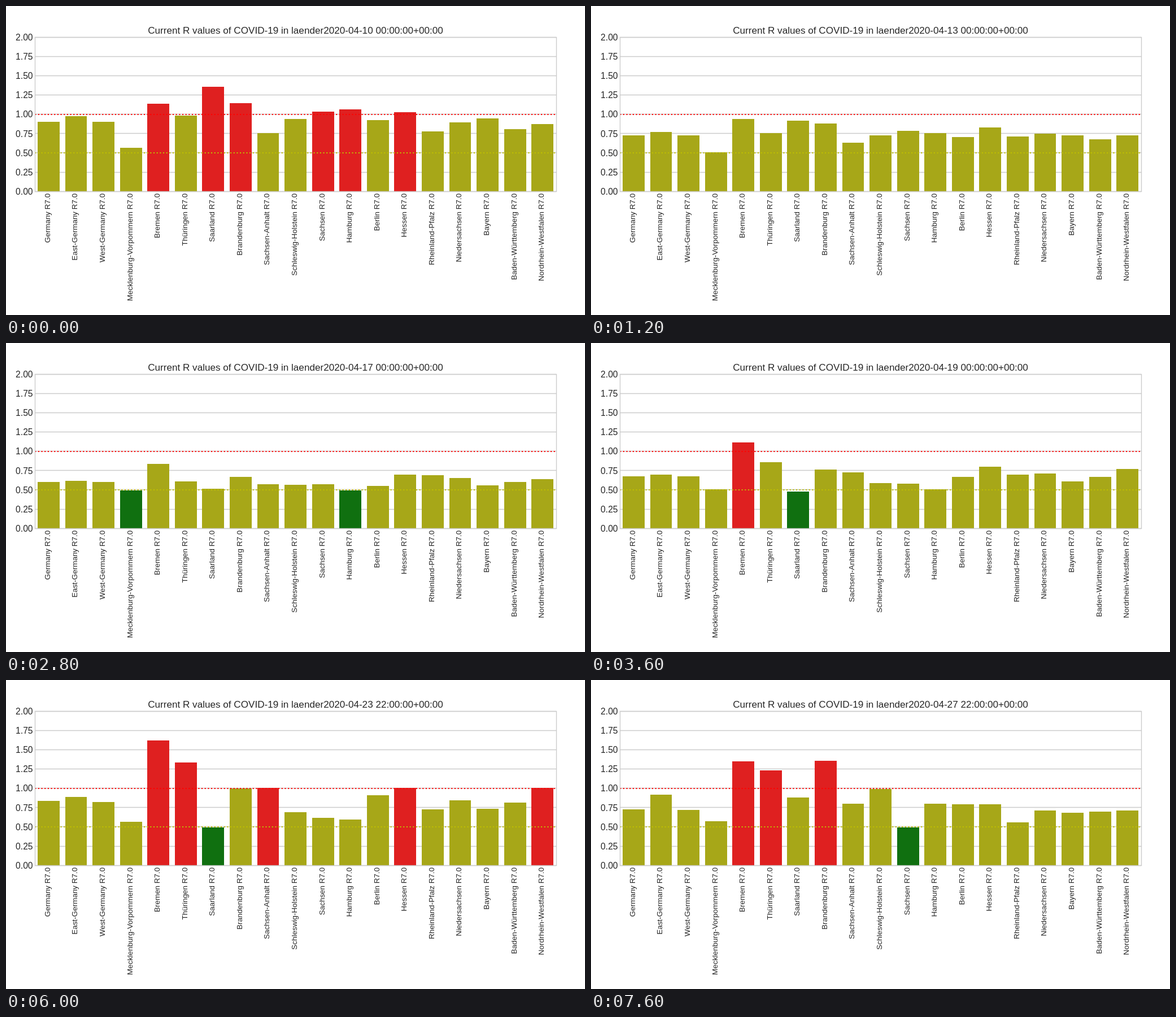
An HTML page for the animation above (8 s loop, 1025 px wide and 547 px high).

```html
<!DOCTYPE html>
<html lang="en">
<head>
<meta charset="utf-8">
<title>R values by state</title>
<style>
  html, body { margin: 0; width: 100%; height: 100%; overflow: hidden; background: #fff; }
  svg { display: block; width: 1025px; height: 547px; }
  text { font-family: "Liberation Sans", Arial, sans-serif; fill: #262626; }
</style>
</head>
<body>
<svg id="chart" viewBox="0 0 1025 547"></svg>
<script>
const STEP_MS = 400;
const LEFT = 51.15, RIGHT = 974, BASE = 328.2, UNIT = 136.6;

// National R value in percent, as [day, value] turning points
const trend = [[0, 90.5], [3, 72.7], [7, 60.2], [9, 67.6], [12, 74.9], [14, 83.6], [18, 72.7]];

// Each region's distance from the trend, in percent, on the anchor days
const anchorDays = [0, 6, 13, 18];
const regions = [
  ["Germany", 0, 0, 0, 0],
  ["East-Germany", 7, 1, 4, 19],
  ["West-Germany", 0, 0, -1, -1],
  ["Mecklenburg-Vorpommern", -34, -10, -28, -16],
  ["Bremen", 23, 20, 80, 62],
  ["Thüringen", 8, -2, 50, 50],
  ["Saarland", 45, -7, -39, 15],
  ["Brandenburg", 24, 6, 12, 63],
  ["Sachsen-Anhalt", -15, -4, 18, 7],
  ["Schleswig-Holstein", 3, -3, -18, 26],
  ["Sachsen", 13, -2, -21, -24],
  ["Hamburg", 16, -10, -27, 7],
  ["Berlin", 2, -6, 8, 6],
  ["Hessen", 12, 9, 18, 6],
  ["Rheinland-Pfalz", -13, 10, -10, -17],
  ["Niedersachsen", -1, 5, 1, -2],
  ["Bayern", 4, -4, -10, -5],
  ["Baden-Württemberg", -10, 0, -2, -3],
  ["Nordrhein-Westfalen", -3, 3, 19, -2]
].map(([name, ...offsets]) => ({ name, path: offsets.map((v, i) => [anchorDays[i], v]) }));

// Report times in hours: daily at midnight, later daily at 22:00
const midnights = Array.from({ length: 14 }, (_, day) => day * 24);
const evenings = Array.from({ length: 6 }, (_, i) => (12 + i) * 24 + 22);
const reports = [...midnights, ...evenings].sort((a, b) => a - b);

const linear = u => u;
const smooth = u => u * u * (3 - 2 * u);

function along(path, day, ease) {
  const next = path.findIndex(([d], i) => i > 0 && d >= day);
  const [d0, v0] = path[next - 1], [d1, v1] = path[next];
  return v0 + (v1 - v0) * ease((day - d0) / (d1 - d0));
}

const valueOf = (region, day) => (along(trend, day, linear) + along(region.path, day, smooth)) / 100;
const colorOf = r => r >= 1 ? "#df2020" : r > .5 ? "#a7a718" : "#107010";

function stamp(hours) {
  const iso = new Date(Date.UTC(2020, 3, 10, hours)).toISOString();
  return iso.slice(0, 19).replace("T", " ") + "+00:00";
}

const svg = document.getElementById("chart");
const pitch = (RIGHT - LEFT) / regions.length;
const yOf = r => BASE - r * UNIT;
const crisp = v => Math.floor(v) + .5;

function add(tag, attrs, content = "") {
  const node = document.createElementNS("http://www.w3.org/2000/svg", tag);
  for (const name in attrs) node.setAttribute(name, attrs[name]);
  node.textContent = content;
  return svg.appendChild(node);
}

const hLine = (y, attrs) => add("line", { x1: LEFT, x2: RIGHT, y1: y, y2: y, ...attrs });

for (let i = 0; i <= 8; i++) {
  const y = yOf(i / 4);
  hLine(crisp(y), { stroke: "#ccc", "stroke-width": 1.4 });
  add("text", { x: 47.6, y: Math.round(y + 5.8), "font-size": 15.7, "text-anchor": "end" }, (i / 4).toFixed(2));
}

const bars = regions.map(({ name }, i) => {
  const center = LEFT + (i + .5) * pitch;
  add("text", {
    transform: `translate(${Math.floor(center + 2.9)} 331.8) rotate(-90)`,
    "font-size": 13.45, "text-anchor": "end"
  }, name + " R7.0");
  const x = Math.round(center - pitch * .4);
  return add("rect", { x, width: Math.round(center + pitch * .4) - x });
});

for (const [r, stroke] of [[1, "#f00"], [.5, "#bfbf00"]])
  hLine(Math.round(yOf(r)), { stroke, "stroke-width": 2.14, "stroke-dasharray": "2.14 3.53" });

add("rect", {
  x: crisp(LEFT), y: crisp(yOf(2)),
  width: crisp(RIGHT) - crisp(LEFT), height: crisp(BASE) - crisp(yOf(2)),
  fill: "none", stroke: "#ccc", "stroke-width": 1.4
});
const title = add("text", { x: 512.5, y: 49, "font-size": 17.13, "text-anchor": "middle" });

let shown = -1;
function draw(ms) {
  const step = Math.floor(ms / STEP_MS) % reports.length;
  if (step === shown) return;
  shown = step;
  const hours = reports[step];
  title.textContent = "Current R values of COVID-19 in laender" + stamp(hours);
  bars.forEach((bar, i) => {
    const r = valueOf(regions[i], hours / 24);
    const top = Math.round(yOf(r));
    bar.setAttribute("y", top);
    bar.setAttribute("height", Math.round(BASE) - top);
    bar.setAttribute("fill", colorOf(r));
  });
}

const start = performance.now();
function tick() {
  draw(performance.now() - start);
  requestAnimationFrame(tick);
}
tick();
</script>
</body>
</html>
```
